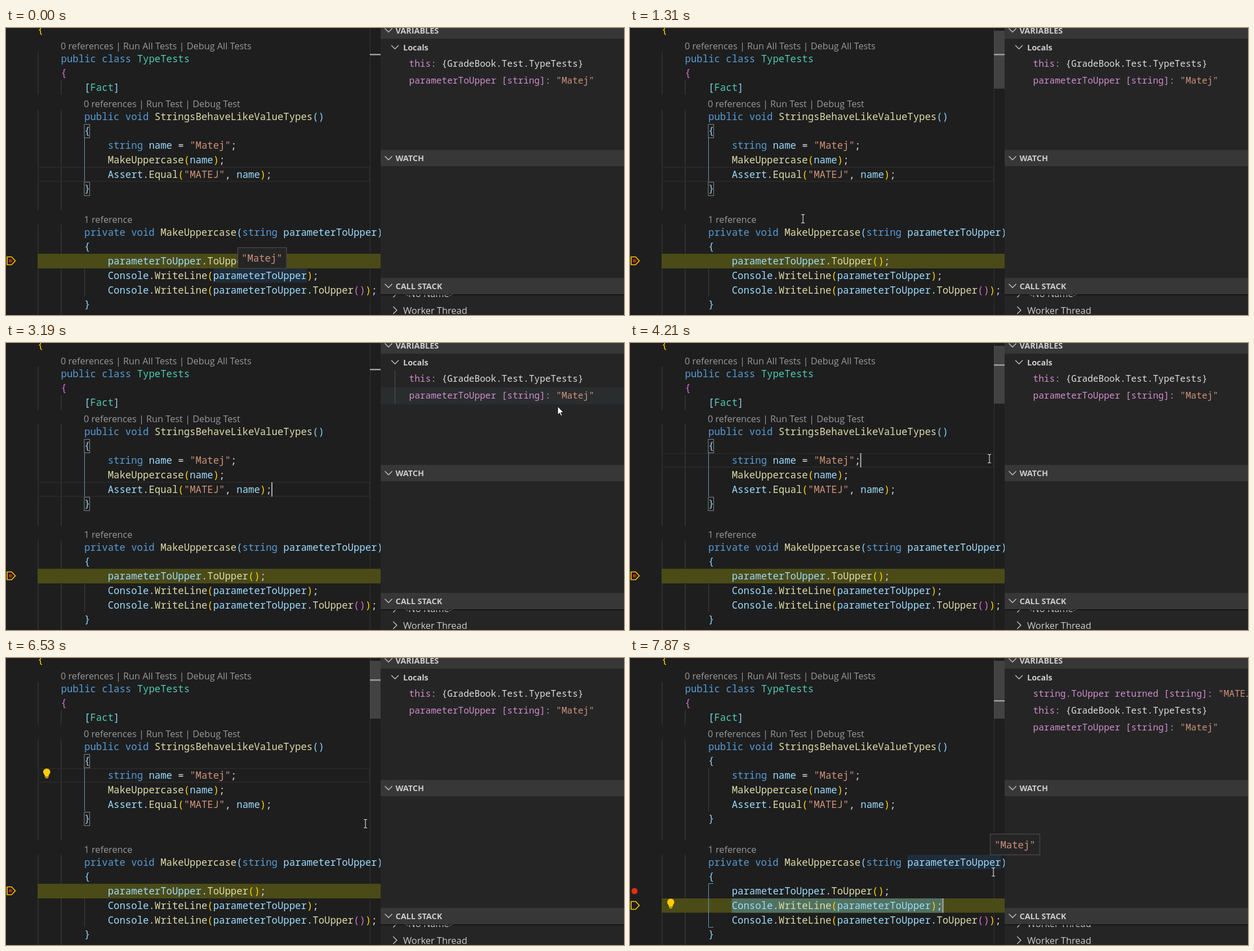
An HTML page that plays this animation: 1097 by 511 pixels, repeating every 8 s.

```html
<!DOCTYPE html>
<html lang="en">
<head>
<meta charset="utf-8">
<title>Debugging a string parameter</title>
<style>
  html, body { margin: 0; width: 100%; height: 100%; overflow: hidden; background: #1e1e1e; }
  svg { display: block; width: 100%; height: 100%; }
  text { white-space: pre; }
  .code { font: 500 17.32px "Noto Sans Mono", "Liberation Mono", monospace; fill: #dcdcdc; }
  .vars { font: 500 16.12px "Noto Sans Mono", "Liberation Mono", monospace; fill: #ce8dc9; }
  .lens { font: 16.27px "Open Sans", "Noto Sans", sans-serif; fill: #999; }
  .head { font: bold 14.4px "Open Sans", "Noto Sans", sans-serif; fill: #ccc; }
  .stack { font: 16.4px "Open Sans", "Noto Sans", sans-serif; fill: #ccc; }
  .k { fill: #569cd6; }
  .t { fill: #4ec9b0; }
  .v { fill: #9cdcfe; }
  .m { fill: #dcdcaa; }
  .s { fill: #ce9178; }
  .o { fill: #dcdcdc; }
  .b1 { fill: #ffd700; }
  .b2 { fill: #da70d6; }
  .b3 { fill: #8fd4fc; }
  .guides { stroke: #404040; fill: none; }
  .active { stroke: #6598b8; fill: none; }
  .current { stroke: #282828; stroke-width: 2; fill: none; }
  .step { fill: #4b4b18; }
  .word { fill: #202c39; }
  .caret { fill: #aeafad; }
  .arrow { stroke: #ffcc00; stroke-width: 1.6; stroke-linejoin: round; fill: none; }
  .chev { stroke: #c5c5c5; stroke-width: 1.4; fill: none; }
  .bar { fill: #373738; }
  .tip rect { fill: #252526; stroke: #454545; stroke-width: 1.5; }
</style>
</head>
<body>
<svg viewBox="0 0 1097 511">
  <defs>
    <g id="bulb" fill="#ffcc00">
      <circle r="6.3"/>
      <path d="M-3.5 4h7v4.5h-7zM-2.6 9.5h5.2v1.5h-5.2z"/>
    </g>
    <path id="down" class="chev" d="M-6.5 -3.2L0 3.3L6.5 -3.2"/>
    <path id="right" class="chev" d="M-3.2 -6.5L3.3 0L-3.2 6.5"/>
    <path id="pentagon" class="arrow" d="M2 -7H10L16.500 0L10 7H2Z"/>
    <clipPath id="stackBody"><rect x="665" y="474" width="432" height="37"/></clipPath>
  </defs>

  <!-- editor -->
  <rect width="1097" height="511" fill="#1e1e1e"/>
  <path class="guides" d="M57 42V119M57 144.500V325M57 350.500V511M98 93V119M98 144.500V325M98 350.500V511M139.500 196V273M139.500 402V479"/>
  <rect class="current" data-on="0-4160" x="57.500" y="248" width="588" height="25"/>
  <rect class="current" data-on="4160-6620" x="57.500" y="197" width="588" height="24"/>
  <path d="M646.500 0V511" stroke="#333"/>
  <rect class="step" data-on="0-6620" x="56" y="402" width="609" height="26"/>
  <rect class="step" data-on="6700-8000" x="56" y="428" width="609" height="25.500"/>
  <rect data-on="6700-8000" x="180.700" y="428" width="374" height="25.500" fill="#517260"/>
  <rect class="word" data-on="0-830" x="367.700" y="428" width="166.500" height="25.500"/>
  <rect class="word" data-on="7700-8000" x="492.500" y="350.500" width="166.500" height="25.500"/>
  <path class="active" data-on="0-6620" d="M139.500 196V273"/>
  <path class="active" data-on="6700-8000" d="M148 401.500H139.500V479.500H148"/>
  <g data-on="0-6620" fill="none" stroke="#888">
    <rect x="139" y="171.500" width="9.500" height="24"/>
    <rect x="139" y="274.500" width="9.500" height="24"/>
  </g>

  <g class="lens">
    <text x="97" y="37.500">0 references | Run All Tests | Debug All Tests</text>
    <text x="138" y="140.500">0 references | Run Test | Debug Test</text>
    <text x="138.500" y="346.500">1 reference</text>
  </g>
  <g class="code">
    <text x="56" y="9" class="b1">{</text>
    <text x="97.600" y="60.500"><tspan class="k">public class </tspan><tspan class="t">TypeTests</tspan></text>
    <text x="97.600" y="86.200" class="b2">{</text>
    <text x="139.100" y="112"><tspan class="b3">[</tspan><tspan class="t">Fact</tspan><tspan class="b3">]</tspan></text>
    <text x="139.100" y="163.500"><tspan class="k">public void </tspan><tspan class="m">StringsBehaveLikeValueTypes</tspan><tspan class="b3">()</tspan></text>
    <text x="139.100" y="189.200" class="b3">{</text>
    <text x="180.700" y="215"><tspan class="k">string </tspan><tspan class="v">name</tspan> = <tspan class="s">"Matej"</tspan>;</text>
    <text x="180.700" y="240.800"><tspan class="m">MakeUppercase</tspan><tspan class="b1">(</tspan><tspan class="v">name</tspan><tspan class="b1">)</tspan>;</text>
    <text x="180.700" y="266.500"><tspan class="v">Assert</tspan>.<tspan class="m">Equal</tspan><tspan class="b1">(</tspan><tspan class="s">"MATEJ"</tspan>, <tspan class="v">name</tspan><tspan class="b1">)</tspan>;</text>
    <text x="139.100" y="292.200" class="b3">}</text>
    <text x="139.100" y="369.500"><tspan class="k">private void </tspan><tspan class="m">MakeUppercase</tspan><tspan class="b3">(</tspan><tspan class="k">string </tspan><tspan class="v">parameterToUpper</tspan><tspan class="b3">)</tspan></text>
    <text x="139.100" y="395.200" class="b3">{</text>
    <text x="180.700" y="421"><tspan class="v">parameterToUpper</tspan>.<tspan class="m">ToUpper</tspan><tspan class="b1">()</tspan>;</text>
    <text x="180.700" y="446.800"><tspan class="v">Console</tspan>.<tspan class="m">WriteLine</tspan><tspan class="b1">(</tspan><tspan class="v">parameterToUpper</tspan><tspan class="b1">)</tspan>;</text>
    <text x="180.700" y="472.500"><tspan class="v">Console</tspan>.<tspan class="m">WriteLine</tspan><tspan class="b1">(</tspan><tspan class="v">parameterToUpper</tspan>.<tspan class="m">ToUpper</tspan><tspan class="b2">()</tspan><tspan class="b1">)</tspan>;</text>
    <text x="139.100" y="498.200" class="b3">}</text>
  </g>

  <rect class="caret" data-on="700-1200 1700-2200 2700-3200 3700-4160" x="471" y="248" width="2" height="25.500"/>
  <rect class="caret" data-on="4160-4500 5000-5500 5990-6500" x="408.500" y="196" width="2" height="25.500"/>
  <rect class="caret" data-on="6850-7350 7850-8000" x="554.500" y="428" width="2" height="25.500"/>

  <!-- margin glyphs -->
  <g data-on="0-6620">
    <use href="#pentagon" y="414.500"/>
    <circle cx="8" cy="414.500" r="3" fill="#c0260f"/>
  </g>
  <circle data-on="6620-8000" cx="8" cy="415" r="5.500" fill="#e03010"/>
  <use data-on="6700-8000" href="#pentagon" y="440.500"/>
  <use data-on="4350-6620" href="#bulb" x="72.300" y="203"/>
  <use data-on="6850-8000" href="#bulb" x="72.300" y="434.800"/>

  <!-- scroll bar -->
  <rect id="slider" x="646" y="5" width="19" height="103" fill="#797979" fill-opacity=".4"/>
  <g fill="#a0a0a0">
    <rect data-on="0-4160" x="646" y="46" width="19" height="2.500"/>
    <rect data-on="4160-6700" x="646" y="38" width="19" height="2.500"/>
    <rect data-on="6700-8000" x="646" y="75" width="19" height="2.500"/>
  </g>

  <!-- side panel -->
  <rect x="665" width="432" height="511" fill="#252526"/>
  <rect id="hoverRow" x="665" width="432" height="30" fill="#2a2d2e"/>
  <path data-on="400-780 2400-3720" d="M690.500 49V108" stroke="#505050"/>
  <g class="vars">
    <text data-on="7170-8000" x="715.500" y="69">string.ToUpper returned [string]: <tspan class="s">"MATEJ"</tspan></text>
    <g id="locals">
      <text x="715.500" y="69">this: <tspan class="o">{GradeBook.Test.TypeTests}</tspan></text>
      <text x="715.500" y="99">parameterToUpper [string]: <tspan class="s">"Matej"</tspan></text>
    </g>
  </g>
  <g class="stack" clip-path="url(#stackBody)">
    <use href="#right" x="690.500" y="473"/>
    <text data-on="0-6750" x="705" y="478.500">&lt;No Name&gt;</text>
    <text data-on="6750-8000" x="705" y="478.500">Worker Thread</text>
    <use href="#right" x="690.500" y="502.500"/>
    <text x="705" y="508.500">Worker Thread</text>
  </g>
  <rect x="665" y="474" width="432" height="2" fill="#111" fill-opacity=".7"/>
  <g class="bar">
    <rect x="665" width="432" height="19"/>
    <rect x="665" y="217" width="432" height="29"/>
    <rect x="665" y="445" width="432" height="29"/>
  </g>
  <g class="head">
    <use href="#down" x="679" y="4"/>
    <text x="691.500" y="10">VARIABLES</text>
    <use href="#down" x="690.500" y="34"/>
    <text x="705" y="39.500">Locals</text>
    <use href="#down" x="679" y="231.500"/>
    <text x="691.500" y="237">WATCH</text>
    <use href="#down" x="679" y="459"/>
    <text x="691.500" y="465">CALL STACK</text>
  </g>

  <!-- value tips -->
  <g class="tip code" data-on="0-830">
    <rect x="411.500" y="391" width="86.500" height="37"/>
    <text x="418" y="415.500" class="s">"Matej"</text>
  </g>
  <g class="tip code" data-on="7780-8000">
    <rect x="639.500" y="313.500" width="88" height="37"/>
    <text x="647" y="338.500" class="s">"Matej"</text>
  </g>

  <!-- pointer -->
  <g id="pointer">
    <path id="hand" d="M0 0V14.500L3.400 11.500L5.700 16.500L7.800 15.600L5.600 10.500H10Z" fill="#fff" stroke="#111" stroke-width=".8"/>
    <path id="beam" d="M-3 -7.500H-1L0 -6.500L1 -7.500H3M0 -6.500V6.500M-3 7.500H-1L0 6.500L1 7.500H3" fill="none" stroke="#d8d8d8" stroke-width="1.200"/>
  </g>
</svg>
<script>
  const LOOP = 8000, PANEL_X = 665;
  const $ = id => document.getElementById(id);
  const show = (el, on) => { el.style.visibility = on ? 'visible' : 'hidden'; };
  const clamp = v => Math.max(0, Math.min(1, v));

  // pointer path: time, x, y
  const path = [
    [70, 470, 420], [300, 620, 290], [480, 770, 190], [680, 849, 141], [730, 850, 145],
    [830, 640, 215], [1000, 540, 290], [1250, 340, 346], [1450, 232, 325], [1700, 385, 200],
    [1860, 410, 192], [2000, 405, 200], [2080, 490, 300], [2160, 650, 338], [2240, 800, 260],
    [2330, 917, 153], [2500, 1000, 95], [2700, 1075, 60], [2890, 1083, 57], [3110, 1005, 104],
    [3190, 980, 113], [3670, 690, 180], [3980, 638, 206], [4600, 638, 206], [4820, 638, 235],
    [4930, 638, 235], [5050, 638, 249], [5400, 638, 249], [5600, 638, 268], [5770, 638, 272],
    [5990, 638, 285], [6200, 638, 285], [6390, 638, 294], [6500, 638, 294], [6900, 638, 307],
    [7050, 638, 307], [7600, 642, 366], [7870, 645, 381], [8000, 645, 381]
  ];

  function pointerAt(t) {
    const i = Math.max(1, path.findIndex(p => p[0] >= t));
    const [t0, x0, y0] = path[i - 1], [t1, x1, y1] = path[i];
    const f = clamp((t - t0) / (t1 - t0));
    return { x: x0 + (x1 - x0) * f, y: y0 + (y1 - y0) * f };
  }

  const timed = [...document.querySelectorAll('[data-on]')].map(el => ({
    el, spans: el.dataset.on.split(' ').map(s => s.split('-').map(Number))
  }));

  function render(t) {
    for (const { el, spans } of timed) show(el, spans.some(([a, b]) => t >= a && t < b));

    const { x, y } = pointerAt(t);
    const inPanel = x >= PANEL_X, seen = t >= 70;
    $('pointer').setAttribute('transform', `translate(${x.toFixed(1)} ${y.toFixed(1)})`);
    show($('hand'), seen && inPanel);
    show($('beam'), seen && !inPanel);

    // row hover trails the pointer slightly
    const late = pointerAt(t - 80);
    const row = Math.floor((late.y - 49) / 30);
    show($('hoverRow'), late.x >= PANEL_X && (row === 0 || row === 1));
    $('hoverRow').setAttribute('y', 49 + 30 * row);

    const fade = t < 2000 ? (t - 150) / 100 : t < 3500 ? (3190 - t) / 780 : (t - 3780) / 100;
    $('slider').setAttribute('opacity', clamp(fade));
    $('locals').setAttribute('transform', `translate(0 ${t < 7170 ? 0 : 30})`);
  }

  const start = performance.now();
  function tick() {
    render((performance.now() - start) % LOOP);
    requestAnimationFrame(tick);
  }
  tick();
</script>
</body>
</html>
```
